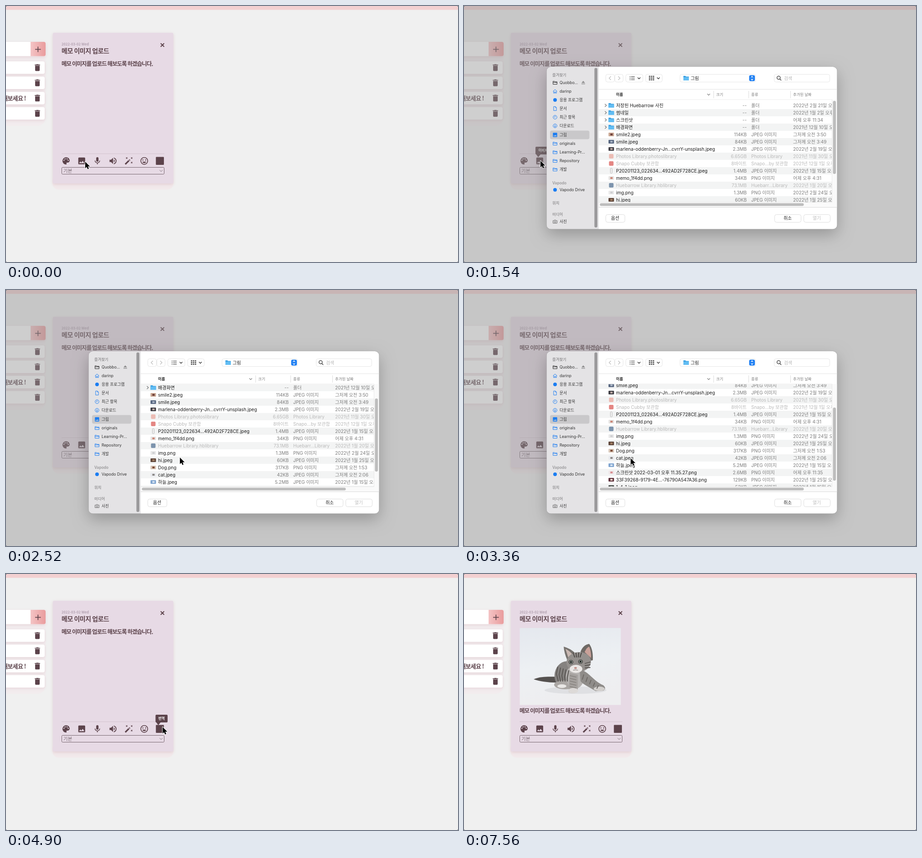
These frames come from a looping animation (993 px wide and 564 px high, 7.98 s). An HTML page with a canvas:

```html
<!DOCTYPE html>
<html lang="ko">
<head>
<meta charset="utf-8">
<title>메모 이미지 업로드</title>
<style>
html, body { margin: 0; width: 100%; height: 100%; overflow: hidden; background: #f0f0f0; }
canvas { display: block; }
</style>
</head>
<body>
<canvas id="stage" width="993" height="564"></canvas>
<script>
const W = 993, H = 564, LOOP = 7980, STEP = 70;
const INK = '#5c434b', BLUE = '#1b7df2';
const UI = 'Inter, "Noto Sans CJK KR", "Noto Sans CJK", sans-serif';
const KR = '"Noto Sans CJK KR", "Noto Sans CJK", sans-serif';
const ctx = document.getElementById('stage').getContext('2d');
const layer = document.createElement('canvas');
layer.width = W;
layer.height = H;
const dlg = layer.getContext('2d');

// --- helpers ---
function text(g, str, x, y, size, color, o = {}) {
  g.font = `${o.weight || 400} ${size}px ${o.family || UI}`;
  g.letterSpacing = (o.space || 0) + 'px';
  g.textAlign = o.align || 'left';
  g.fillStyle = color;
  g.fillText(str, x, y + size * 0.36);
}
function box(g, x, y, w, h, r, fill, stroke) {
  g.beginPath();
  g.roundRect(x, y, w, h, r);
  if (fill) { g.fillStyle = fill; g.fill(); }
  if (stroke) { g.strokeStyle = stroke; g.lineWidth = 1; g.stroke(); }
}
function line(g, pts, color, width = 1) {
  g.beginPath();
  for (let i = 0; i < pts.length; i += 2) g.lineTo(pts[i], pts[i + 1]);
  g.strokeStyle = color;
  g.lineWidth = width;
  g.stroke();
}
function blob(g, x, y, rx, ry, fill, turn = 0) {
  g.beginPath();
  g.ellipse(x, y, rx, ry, turn, 0, Math.PI * 2);
  g.fillStyle = fill;
  g.fill();
}
function shape(g, d, fill, stroke, width = 1) {
  const p = new Path2D(d);
  if (fill) { g.fillStyle = fill; g.fill(p, 'evenodd'); }
  if (stroke) { g.strokeStyle = stroke; g.lineWidth = width; g.stroke(p); }
}
function withShadow(g, color, blur, dy, draw) {
  g.save();
  g.shadowColor = color;
  g.shadowBlur = blur;
  g.shadowOffsetY = dy;
  draw();
  g.restore();
}
// linear value from keys [time, a, b, ...]
function track(keys, t) {
  let i = keys.findIndex(k => k[0] > t);
  if (i < 0) return keys[keys.length - 1].slice(1);
  if (i === 0) return keys[0].slice(1);
  const a = keys[i - 1], b = keys[i], p = (t - a[0]) / (b[0] - a[0]);
  return a.slice(1).map((v, n) => v + (b[n + 1] - v) * p);
}

// --- icons on a 24 unit grid ---
const dot = (x, y, r) => `M${x - r} ${y}a${r} ${r} 0 1 0 ${2 * r} 0 ${r} ${r} 0 1 0 ${-2 * r} 0z`;
const spark = (x, y, r) => {
  const q = r * 0.5;
  return `M${x - r} ${y - r}L${x} ${y - q} ${x + r} ${y - r} ${x + q} ${y} ${x + r} ${y + r} ${x} ${y + q} ${x - r} ${y + r} ${x - q} ${y}z`;
};
const ICONS = {
  trash: 'M6 19a2 2 0 0 0 2 2h8a2 2 0 0 0 2-2V7H6zM19 4h-3.5l-1-1h-5l-1 1H5v2h14z',
  palette: 'M12 2.5a9.5 9.5 0 1 0 0 19 1.6 1.6 0 0 0 1.1-2.6 1.6 1.6 0 0 1 1.2-2.6H16a5.3 5.3 0 0 0 5.4-5.3c0-4.6-4.2-8.5-9.4-8.5z'
    + dot(6.5, 10.5, 1.5) + dot(9.5, 6.5, 1.5) + dot(14.5, 6.5, 1.5) + dot(17.5, 10.5, 1.5),
  image: 'M21 19V5a2 2 0 0 0-2-2H5a2 2 0 0 0-2 2v14a2 2 0 0 0 2 2h14a2 2 0 0 0 2-2zM8.5 13.5l2.5 3 3.5-4.5 4.5 6H5z',
  mic: 'M12 14a3 3 0 0 0 3-3V5a3 3 0 0 0-6 0v6a3 3 0 0 0 3 3zM17.3 11a5.3 5.3 0 0 1-10.6 0H5a7 7 0 0 0 6 6.7V21h2v-3.3a7 7 0 0 0 6-6.7z',
  sound: 'M3 9v6h4l5 5V4L7 9zM16.5 12A4.5 4.5 0 0 0 14 8v8a4.5 4.5 0 0 0 2.5-4zM14 3.2v2.1a7 7 0 0 1 0 13.4v2.1a9 9 0 0 0 0-17.6z',
  wand: 'M1.8 19.4 11.4 9.8l2.8 2.8-9.6 9.6zM12.4 8.8l1.4-1.4 2.8 2.8-1.4 1.4z' + spark(7, 4.5, 2.4) + spark(20, 4.5, 2.4) + spark(20, 16.5, 2.4),
  smile: dot(12, 12, 10) + dot(12, 12, 8) + dot(8.5, 9.5, 1.5) + dot(15.5, 9.5, 1.5) + 'M12 17.5a5.5 5.5 0 0 0 5.1-3.5H6.9a5.5 5.5 0 0 0 5.1 3.5z',
  tile: 'M3 1.5h18a1.5 1.5 0 0 1 1.5 1.5v18a1.5 1.5 0 0 1-1.5 1.5H3A1.5 1.5 0 0 1 1.5 21V3A1.5 1.5 0 0 1 3 1.5z',
  folder: 'M2 5h7l2 2.5h11V20H2zM2 10.5h20',
  home: 'M2 12 12 3l10 9M5 10v11h5v-6h4v6h5V10',
  page: 'M5 2h9l5 5v15H5zM14 2v5h5',
  clock: dot(12, 12, 9.5) + 'M12 6v6H8',
  down: dot(12, 12, 9.5) + 'M12 6.5v11M8 13.5l4 4 4-4',
  camera: 'M2 7h5l2-3h6l2 3h5v13H2z' + dot(12, 13, 4)
};
function icon(g, name, x, y, scale, fill, stroke, width) {
  g.save();
  g.translate(x - 12 * scale, y - 12 * scale);
  g.scale(scale, scale);
  shape(g, ICONS[name], fill, stroke, width);
  g.restore();
}

// --- memo page ---
function kitten(g) {
  const sky = g.createLinearGradient(122, 119, 150, 288);
  sky.addColorStop(0, '#e4e8ee');
  sky.addColorStop(0.55, '#edf0f3');
  sky.addColorStop(1, '#eeeef0');
  g.fillStyle = sky;
  g.fillRect(122.5, 119, 222, 169.5);
  blob(g, 245, 256, 68, 8, '#dfe0e3');
  shape(g, 'M153 232C170 224 190 227 208 226L210 239C190 240 168 237 153 232z', '#55514f');
  blob(g, 224, 222, 25, 30, '#858280', 0.2);
  blob(g, 222, 244, 24, 10, '#aaa6a3');
  blob(g, 244, 226, 20, 27, '#b5b2b0');
  shape(g, 'M254 210C274 214 284 236 306 245Q314 252 306 257L289 258C274 248 262 244 256 236z', '#8f8c89');
  shape(g, 'M232 218L250 222 250 258Q241 266 230 260z', '#a5a19e');
  blob(g, 240, 257, 11, 6, '#dddad8');
  blob(g, 297, 253, 12, 5, '#d3d0cd');
  blob(g, 215, 247, 10, 4, '#e9e7e5');
  g.lineCap = 'round';
  for (let i = 0; i < 5; i++) {
    line(g, [206 + i * 6, 205 + i * 2, 203 + i * 6, 220 + i * 2, 207 + i * 5, 236], '#5d5956', 2.2);
    line(g, [263 + i * 8, 222 + i * 6, 260 + i * 8, 232 + i * 5], '#6b6763', 1.8);
    line(g, [233, 224 + i * 6, 246, 227 + i * 6], '#85817d', 1.5);
  }
  shape(g, 'M219 160Q234 164 245 175L227 190Q220 174 219 160z', '#77736f');
  shape(g, 'M223 165Q232 169 238 177L229 184z', '#c9b8b2');
  shape(g, 'M256 171Q262 156 275 154 284 166 283 190L268 193z', '#6e6965');
  shape(g, 'M265 172Q270 161 275 160 280 172 279 185z', '#c9a199');
  blob(g, 252, 194, 27, 22, '#94908d', -0.12);
  blob(g, 246, 209, 14, 9, '#eae7e5');
  for (let i = 0; i < 4; i++) line(g, [240 + i * 6, 174, 243 + i * 4, 183], '#4c4845', 2);
  for (let i = 0; i < 3; i++) line(g, [266, 197 + i * 5, 277, 194 + i * 6], '#56524f', 1.8);
  for (const [x, y] of [[235, 194], [256, 193]]) {
    blob(g, x, y, 5, 4.5, '#35312f');
    blob(g, x, y, 3.7, 3.4, '#8d9a92');
    blob(g, x, y, 1.9, 2.3, '#191919');
  }
  blob(g, 245, 207, 3, 2, '#c08f88');
  line(g, [240, 212, 245, 211, 250, 212], '#77706c', 1);
  g.lineCap = 'butt';
}
function tooltip(g, x, w, label) {
  box(g, x, 310, w, 17, 2, INK);
  shape(g, `M${x + 1} 326h11l-6 7z`, INK);
  text(g, label, x + w / 2, 318.5, 7.5, '#fff', { weight: 700, align: 'center', family: KR });
}
function page(g, t) {
  g.fillStyle = '#f0f0f0';
  g.fillRect(0, 0, W, H);
  g.fillStyle = '#f3d0d1';
  g.fillRect(0, 0, W, 8.5);

  box(g, -40, 100, 127, 164, 18, '#f2ecee');
  withShadow(g, 'rgba(190,140,150,.25)', 6, 2, () => {
    box(g, -20, 79, 107, 31.5, 4, '#fff');
    for (let i = 0; i < 4; i++) box(g, -20, 122 + i * 33.6, 105, 27.5, 4, '#fff');
  });
  const pink = g.createLinearGradient(54, 0, 87, 0);
  pink.addColorStop(0, '#f4c4c5');
  pink.addColorStop(1, '#e99c9d');
  box(g, 54, 79, 33, 31.5, [0, 4, 4, 0], pink);
  line(g, [64, 95.5, 76.5, 95.5], INK, 1.7);
  line(g, [70.3, 89.5, 70.3, 101.5], INK, 1.7);
  for (let i = 0; i < 4; i++) icon(g, 'trash', 69, 135.7 + i * 33.6, 0.83, INK);
  text(g, '해보세요 !', 43.5, 203, 13, INK, { weight: 700, family: KR, align: 'right', space: -0.7 });

  box(g, 102, 370, 266, 34.5, 14, '#f2e9eb');
  withShadow(g, 'rgba(190,140,150,.3)', 6, 2, () => box(g, 103, 59, 264.5, 332, 3, '#e7dae5'));
  const bold = { weight: 700, family: KR };
  text(g, '2022-03-02 Wed', 122, 84, 7.7, '#b3a2b1', bold);
  text(g, '메모 이미지 업로드', 122, 99, 14, INK, { ...bold, space: -0.5 });
  line(g, [339.8, 82.2, 347.4, 89.8], INK, 2);
  line(g, [347.4, 82.2, 339.8, 89.8], INK, 2);
  const loaded = t >= 5600;
  if (loaded) kitten(g);
  text(g, '메모 이미지를 업로드 해보도록 하겠습니다.', 122, loaded ? 301 : 127, 12.5, INK, { ...bold, space: -0.95 });

  line(g, [122, 325.5, 348, 325.5], '#d3c3cf');
  ['palette', 'image', 'mic', 'sound', 'wand', 'smile', 'tile'].forEach((name, i) =>
    icon(g, name, 132 + i * 34.35, 341.3, 0.84, INK));
  box(g, 122.5, 355.5, 225, 15, 2, null, '#76656e');
  text(g, '기본', 126, 363, 10.5, '#7b6c75', { family: KR });
  line(g, [337.5, 361.5, 340.7, 364.7, 344, 361.5], '#7b6c75');
  if (t >= 560 && t < 1680) tooltip(g, 157, 56, '이미지 업로드');
  if (t >= 4830 && t < 5670) tooltip(g, 328.5, 26.5, '번역');
}

// --- file dialog ---
// name, size, kind, date, thumbnail colours
const JPG = 'JPEG 이미지', PNG = 'PNG 이미지';
const FILES = [
  ['저장된 Huebarrow 사진', '--', '폴더', '2022년 2월 21일 오전'],
  ['썸네일', '--', '폴더', '2022년 1월 2일 오후'],
  ['스크린샷', '--', '폴더', '어제 오후 11:34'],
  ['배경화면', '--', '폴더', '2021년 12월 10일 오후'],
  ['smile2.jpeg', '114KB', JPG, '그저께 오전 3:50', '#c9a793', '#6b3e38'],
  ['smile.jpeg', '84KB', JPG, '그저께 오전 3:49', '#55647e', '#a9b4c4'],
  ['marlena-oddenberry-Jn...cvrrY-unsplash.jpeg', '2.3MB', JPG, '2022년 2월 19일 오후', '#3b3a40', '#bca9a4'],
  ['Photos Library.photoslibrary', '6.65GB', 'Photos Library', '2021년 11월 30일 오후', 'off', '#e8a69b'],
  ['Snapo Cubby 보관함', '8바이트', 'Snapo...by 보관함', '2021년 12월 1일 오후', 'off', '#d9534f'],
  ['P20201123_022634...492AD2F728CE.jpeg', '1.4MB', JPG, '2022년 1월 15일 오후', 'tall', '#d8d8d8'],
  ['memo_1f4dd.png', '34KB', PNG, '어제 오후 4:31', '#e6e3e1', '#c98474'],
  ['Huebarrow Library.hblibrary', '73.1MB', 'Huebarr...Library', '2022년 1월 20일 오후', 'off', '#4c6d90'],
  ['img.png', '1.3MB', PNG, '2022년 2월 24일 오후', '#e9e9e9', '#cfd0d2'],
  ['hi.jpeg', '60KB', JPG, '2022년 1월 25일 오후', '#5d4438', '#a07d62'],
  ['Dog.png', '317KB', PNG, '그저께 오전 1:53', '#d8c7b8', '#7c4a35'],
  ['cat.jpeg', '42KB', JPG, '그저께 오전 2:06', '#e8eaee', '#8b8886'],
  ['하늘.jpeg', '5.2MB', JPG, '2022년 1월 15일 오후', '#7da3cf', '#d5e2f0'],
  ['스크린샷 2022-03-01 오후 11.35.27.png', '2.6MB', PNG, '어제 오후 11:35', '#efe6e8', '#d98f92'],
  ['33F39268-9179-4E...-76790A547A36.png', '129KB', PNG, '2022년 1월 25일 오후', '#5b2e38', '#e6cfc5'],
  ['1-4-1.jpeg', '52KB', JPG, '2022년 1월 15일 오후', '#4a4f4c', '#98a19a']
];
const PICK = 15;

function blueFolder(g, x, y) {
  shape(g, `M${x - 6} ${y - 5}h4.5l1.5 1.5h6v8.5h-12z`, '#3a9fe0');
  box(g, x - 6, y - 2.3, 12, 7.3, 1, '#62bdf3');
}
function thumb(g, f, y) {
  const x = 323.5, [a, b] = f.slice(4);
  if (!a) return blueFolder(g, x, y);
  if (a === 'off') { g.globalAlpha *= 0.7; box(g, x - 5, y - 5, 10, 10, 2, b); return; }
  if (a === 'tall') return box(g, x - 2, y - 5.5, 4, 11, 1, '#f1f1f1', '#b9b9b9');
  box(g, x - 6, y - 4, 12, 8, 1, a);
  g.fillStyle = b;
  g.fillRect(x - 2, y - 2, 5, 4);
}
function rows(g, scroll, picked, top, bottom, alpha) {
  g.save();
  g.beginPath();
  g.rect(296, top, 512, bottom - top);
  g.clip();
  FILES.forEach((f, i) => {
    const y = 220 + i * 16 - scroll, on = picked && i === PICK, off = f[4] === 'off';
    if (y < top - 8 || y > bottom + 8) return;
    if (on || i % 2) {
      g.globalAlpha = 1;
      g.fillStyle = on ? '#0058d0' : '#f3f4f4';
      g.fillRect(296, y - 8, 512, 16);
    }
    const main = on ? '#fff' : off ? '#b9b9b9' : '#1c1c1c', side = on ? '#fff' : off ? '#b9b9b9' : '#7c7c7c';
    g.globalAlpha = alpha;
    if (!f[4]) line(g, [309.5, y - 3.2, 313, y, 309.5, y + 3.2], '#777', 1.2);
    thumb(g, f, y);
    g.globalAlpha = alpha;
    text(g, f[0], 334, y, 10, main);
    text(g, f[1], 621, y, 10, side, { align: 'right' });
    text(g, f[2], 631, y, 10, side);
    text(g, f[3], 723, y, 10, side);
  });
  g.restore();
}
const PLACES = [
  ['folder', 'Quobbo...', 170], ['home', 'darinp', 189], ['', '응용 프로그램', 208], ['page', '문서', 227],
  ['clock', '최근 항목', 246], ['down', '다운로드', 265], ['image', '그림', 285], ['folder', 'originals', 304],
  ['folder', 'Learning-Pr...', 323], ['folder', 'Repository', 342], ['folder', '개발', 361],
  ['', 'Vapodo Drive', 406], ['camera', '사진', 476]
];
function sidebar(g, closing) {
  g.fillStyle = '#e4e3e5';
  g.fillRect(181, 135, 115, 358);
  for (const [label, y] of [['즐겨찾기', 153], ['Vapodo', 391], ['위치', 435], ['미디어', 460]])
    text(g, label, 194, y, 8.4, '#99989a', { weight: 600 });
  box(g, 189, 275.5, 86.5, 19, 4, '#c9c8ca');
  PLACES.forEach(([name, label, y], i) => {
    const tint = closing || i === 0 ? '#222' : i === 12 ? '#666' : BLUE;
    if (!name) blob(g, 200, y, 4, 4, tint);
    else if (name === 'image') icon(g, name, 200, y, 0.52, tint);
    else icon(g, name, 200, y, 0.44, null, tint, 2.2);
    text(g, label, 210, y, 8.7, '#333');
  });
  shape(g, 'M258 170.5l4-4.5 4 4.5zM258 172h8v1.3h-8z', '#8c8c8c');
  box(g, 286.5, 137.5, 6.5, 351.5, 3.2, '#9a999b');
}
function button(g, x, w, label, color, fill = '#fff') {
  box(g, x + 0.5, 460.5, w, 17, 4, fill, fill === '#fff' ? '#dedede' : null);
  text(g, label, x + w / 2, 468.5, 9.8, color, { align: 'center', weight: 500 });
}
function chevron(g, x, y, color = '#333') {
  line(g, [x - 3, y - 1.5, x, y + 1.5, x + 3, y - 1.5], color, 1.3);
}
function dialogPath(g, dy) {
  g.beginPath();
  g.roundRect(181.5, 135 + dy, 638, 357.5, 9);
}
function dialog(g, scroll, closing) {
  g.clearRect(0, 0, W, H);
  g.save();
  dialogPath(g, 0);
  g.clip();
  sidebar(g, closing);
  g.fillStyle = '#fff';
  g.fillRect(296, 135, 524, 358);

  for (const [x, w] of [[311.5, 19], [331.5, 18], [355.5, 37.5], [399, 36.5], [474.5, 166], [681.5, 122]])
    box(g, x, 151.5, w, 17, 4, '#fff', '#e6e6e6');
  line(g, [322.8, 156, 318.8, 160, 322.8, 164], '#bbb', 1.2);
  line(g, [338.8, 156, 342.8, 160, 338.8, 164], '#bbb', 1.2);
  for (let i = -1; i < 2; i++) {
    line(g, [364, 160 + i * 3.5, 365.5, 160 + i * 3.5], '#333', 1.3);
    line(g, [367, 160 + i * 3.5, 375, 160 + i * 3.5], '#333', 1.2);
    for (let j = -1; j < 2; j++) {
      g.fillStyle = '#555';
      g.fillRect(410.5 + i * 4.3, 158.5 + j * 3.8, 3, 2.6);
    }
  }
  chevron(g, 384.5, 160);
  chevron(g, 427, 160);
  blueFolder(g, 488, 160);
  text(g, '그림', 498, 160, 9.8, '#222');
  box(g, 626.5, 153.5, 12.5, 13, 3, BLUE);
  line(g, [630.5, 158.5, 632.8, 156, 635, 158.5], '#fff', 1.2);
  line(g, [630.5, 161.5, 632.8, 164, 635, 161.5], '#fff', 1.2);
  shape(g, dot(691.2, 159, 3.6) + 'M693.8 161.8l3.2 3.2', null, '#333', 1.3);
  text(g, '검색', 703, 160, 9.8, '#b8b8b8');

  if (closing) rows(g, scroll, false, 186, 207, 0.22);
  line(g, [296, 184.5, 820, 184.5], '#e3e3e3');
  text(g, '이름', 334, 196, 8.3, '#222', { weight: 700 });
  chevron(g, 537.5, 196, '#888');
  [[548.5, '크기'], [625.5, '종류'], [717.5, '추가된 날짜']].forEach(([x, label]) => {
    line(g, [x, 188, x, 204], '#dcdcdc');
    text(g, label, x + 5.5, 196, 8.3, '#777');
  });
  line(g, [296, 207, 808, 207], '#ececec');
  rows(g, scroll, closing, 207.5, 433, 1);

  g.fillStyle = '#fafafa';
  g.fillRect(808.5, 207, 11, 237);
  g.fillRect(296, 433, 523, 11);
  line(g, [808.5, 207, 808.5, 433.5, 296, 433.5], '#e8e8e8');
  box(g, 810.5, 210 + scroll * 0.545, 6.5, 161, 3.2, '#bdbdbd');
  box(g, 298.5, 435.5, 448, 6, 3, '#bdbdbd');
  line(g, [296, 444.5, 820, 444.5], '#d9d9d9');

  button(g, 311, 42, '옵션', '#222');
  button(g, 682, 58, '취소', '#222');
  if (closing) button(g, 746, 58, '열기', '#fff', '#0a74f2');
  else button(g, 746, 58, '열기', '#bdbdbd');
  g.restore();
}
// shadow falls only outside the sheet, so a faded sheet stays light
function sheetShadow(g, opacity, dy) {
  g.save();
  g.beginPath();
  g.rect(0, 0, W, H);
  g.roundRect(181.5, 135 + dy, 638, 357.5, 9);
  g.clip('evenodd');
  withShadow(g, `rgba(0,0,0,${0.25 * opacity})`, 34, 12, () => {
    dialogPath(g, dy);
    g.fillStyle = '#000';
    g.fill();
  });
  g.restore();
}

// --- pointer ---
function pointer(g, x, y, hand) {
  g.save();
  g.translate(x, y);
  g.lineJoin = 'round';
  const d = hand
    ? 'M-1.5 1a1.6 1.6 0 0 1 3 0l1.2 5 1-.5 1.5.8 1.5-.3 1 1 1.3.4 1 4-1 5H1L-4.5 10q0-2 2-1.5l1.5 1z'
    : 'M0 0V14.5L3.3 11.4 5.5 16.4 8 15.3 5.8 10.5H10.5z';
  if (hand) shape(g, d, '#fff', '#222', 1.2);
  else {
    shape(g, d, null, '#fff', 1.8);
    shape(g, d, '#000');
  }
  g.restore();
}

// --- timeline ---
const POINTER = [
  [0, 174, 343], [350, 168, 341], [1540, 168, 341], [1890, 382, 369], [3150, 382, 369],
  [3640, 345, 373], [4550, 345, 374], [4900, 344, 337], [5530, 344, 337], [5810, 360, 268],
  [7070, 360, 268], [7280, 510, 450], [7350, 510, 450], [7560, 510, 570]
];
const SCROLL = [[2030, 0], [2100, 4], [2240, 24], [2380, 45], [2520, 53], [2730, 53], [2800, 67], [2870, 82], [2940, 89], [3010, 89], [3080, 90]];
// time, veil, opacity, vertical offset
const SHEET = [
  [1190, 0, 0, -32], [1260, 0.05, 0.15, -29], [1330, 0.19, 0.42, -23], [1400, 0.52, 0.74, -11], [1470, 0.83, 0.94, -4],
  [1540, 0.98, 1, -1], [1680, 1, 1, 0], [3990, 1, 1, 0], [4130, 0.91, 0.9, -2],
  [4200, 0.76, 0.72, -4], [4270, 0.51, 0.5, -11], [4340, 0.26, 0.28, -20], [4410, 0.09, 0.1, -28], [4480, 0, 0, -32]
];

function draw(t) {
  page(ctx, t);
  const [veil, opacity, rise] = track(SHEET, t);
  if (opacity > 0) {
    const dy = Math.round(rise);
    ctx.fillStyle = `rgba(148,148,148,${0.46 * veil})`;
    ctx.fillRect(0, 0, W, H);
    sheetShadow(ctx, opacity, dy);
    dialog(dlg, track(SCROLL, t)[0], t >= 3920);
    ctx.globalAlpha = opacity;
    ctx.drawImage(layer, 0, dy);
    ctx.globalAlpha = 1;
  }
  const [x, y] = track(POINTER, t);
  pointer(ctx, x, y, t >= 3920 && t < 4620);

  // rounded window corners
  ctx.beginPath();
  ctx.rect(0, 0, W, H);
  ctx.roundRect(0, 0, W, H, 2.5);
  ctx.fillStyle = '#555';
  ctx.fill('evenodd');
}

const start = performance.now();
let last = -1;
function tick() {
  const t = Math.floor(((performance.now() - start) % LOOP) / STEP) * STEP;
  if (t !== last) draw(last = t);
  requestAnimationFrame(tick);
}
tick();
</script>
</body>
</html>
```
